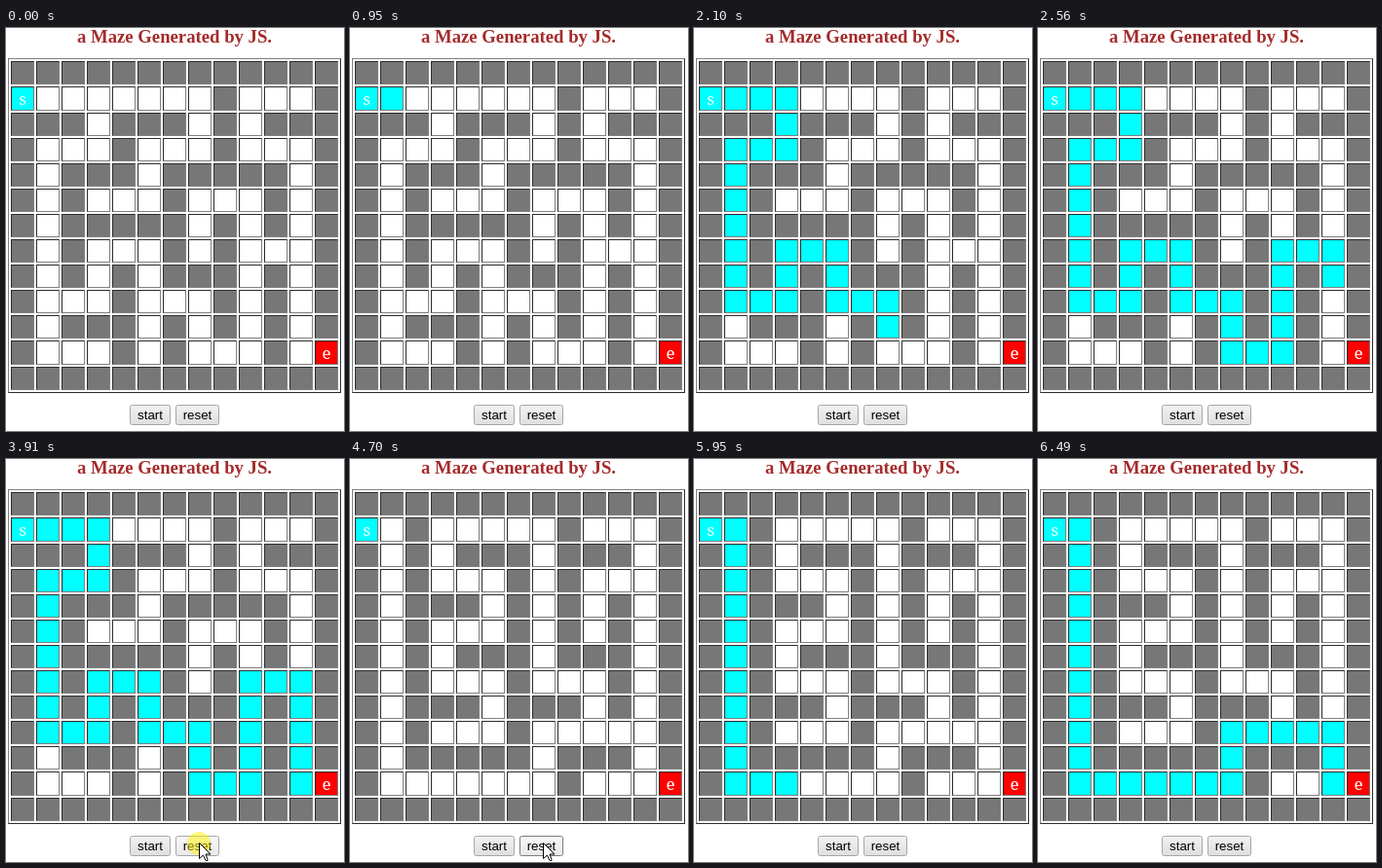
An HTML page with a canvas that plays this animation: 347x414 px, repeating every 7460 ms.

```html
<!DOCTYPE html>
<html lang="en">
<head>
<meta charset="utf-8">
<title>Maze</title>
<style>
  html, body { margin: 0; width: 100%; height: 100%; overflow: hidden; background: #fff; }
  canvas { display: block; }
</style>
</head>
<body>
<canvas id="stage" width="347" height="414"></canvas>
<script>
const ctx = document.getElementById('stage').getContext('2d');
const LOOP = 7460, RESET = 3990;
const LIGHT = '#808080', DARK = '#2c2c2c', MITRE = '#565656';

// Each maze is solved from `start` on, one cell per `step` milliseconds.
const first = makeMaze(950, 48.7, `
#############
        #   #
### ### # ###
#   #   #   #
# ### ##### #
# #   #   # #
# ##### # # #
# #   # #   #
# # # ### # #
#   #   # # #
# ### # # # #
#   # #   #  
#############`);
const second = makeMaze(5340, 47.9, `
#############
  #     #   #
# # ### ### #
# #   # #   #
# ### # # # #
# #   # # # #
# # ### ### #
# #   #   # #
# ### ### # #
# #   #     #
# ##### ### #
#       #    
#############`);

function makeMaze(start, step, plan) {
  const rows = plan.slice(1).split('\n');
  return { start, step, rows, path: solve(rows, 1, 1, 0, 1) };
}

// Depth-first search for the cells leading to the exit in column 12.
function solve(rows, x, y, fromX, fromY) {
  if (x === 12) return [];
  for (const [nx, ny] of [[x + 1, y], [x, y + 1], [x - 1, y], [x, y - 1]]) {
    if (rows[ny][nx] !== ' ' || nx === 0 || (nx === fromX && ny === fromY)) continue;
    const rest = solve(rows, nx, ny, x, y);
    if (rest) return [[x, y], ...rest];
  }
  return null;
}

const ramp = (t, from, to) => Math.min(1, Math.max(0, (t - from) / (to - from)));
const within = (t, from, to) => t >= from && t < to;

function pointerAt(t) {
  const pressed = within(t, 770, 850) || within(t, 3830, RESET) || within(t, 5160, 5290);
  if (t < 2000)
    return { x: 148, y: 414 - 17 * (ramp(t, 310, 520) - ramp(t, 850, 900)), pressed };
  const shift = ramp(t, 4700, 5050);
  return {
    x: 198 - 45 * shift,
    y: 414 + 4 * shift - 20 * (ramp(t, 3300, 3400) - ramp(t, 5440, 5470)),
    pressed
  };
}

function rect(color, x, y, w, h) {
  ctx.fillStyle = color;
  ctx.fillRect(x, y, w, h);
}

function bevel(topLeft, bottomRight, inside, x, y, w, h) {
  rect(bottomRight, x, y, w, h);
  rect(topLeft, x, y, w - 1, h - 1);
  rect(MITRE, x + w - 1, y, 1, 1);
  rect(MITRE, x, y + h - 1, 1, 1);
  rect(inside, x + 1, y + 1, w - 2, h - 2);
}

function text(string, x, y, font, color) {
  ctx.font = font;
  ctx.fillStyle = color;
  ctx.textAlign = 'center';
  ctx.fillText(string, x, y);
}

function drawCell(col, row, color) {
  // The two lettered rows are one pixel taller.
  const y = 34 + 26 * row + (row > 1) + (row > 11);
  const h = row === 1 || row === 11 ? 25 : 24;
  bevel(DARK, LIGHT, color, 5 + 26 * col, y, 24, h);
}

function drawMaze({ start, step, rows, path }, t) {
  bevel(LIGHT, DARK, '#fff', 2, 31, 342, 344);
  rows.forEach((line, row) => [...line].forEach((mark, col) =>
    drawCell(col, row, mark === '#' ? '#777' : '#fff')));
  const filled = Math.max(0, Math.floor((t - start) / step) + 1);
  for (const [col, row] of path.slice(0, filled)) drawCell(col, row, '#0ff');
  drawCell(0, 1, '#0ff');
  drawCell(12, 11, '#f00');
  const font = '17px "Noto Serif", serif';
  text('s', 17, 79, font, '#fff');
  text('e', 329, 340, font, '#fff');
}

function drawButton(label, x, w, pointer) {
  const hover = within(pointer.x, x, x + w) && pointer.y < 408;
  const face = ctx.createLinearGradient(0, 387, 0, 408);
  face.addColorStop(0, hover ? '#f8f8f8' : '#f2f2f2');
  face.addColorStop(1, hover ? '#e8e8e8' : '#dedede');
  ctx.beginPath();
  ctx.roundRect(x + .5, 387.5, w - 1, 20, 2);
  ctx.fillStyle = face;
  ctx.fill();
  ctx.strokeStyle = hover && !pointer.pressed ? '#7b7b7b' : '#a6a6a6';
  ctx.lineWidth = 1;
  ctx.stroke();
  text(label, x + w / 2, 402, '13.333px "Liberation Sans", Arial, sans-serif', '#000');
}

function drawPointer({ x, y, pressed }) {
  if (pressed) {
    ctx.fillStyle = 'rgba(255, 240, 0, .5)';
    ctx.beginPath();
    ctx.arc(x, y + 1, 12, 0, 7);
    ctx.fill();
  }
  ctx.save();
  ctx.translate(Math.round(x) + .5, Math.round(y) + .5);
  const arrow = new Path2D('M0 0V16L4 12.5L6.5 18H8.5V17L6.5 11.5H11.5Z');
  ctx.fillStyle = '#fff';
  ctx.fill(arrow);
  ctx.strokeStyle = '#000';
  ctx.stroke(arrow);
  ctx.restore();
}

function draw(t) {
  const pointer = pointerAt(t);
  rect('#fff', 0, 0, 347, 414);
  text('a Maze Generated by JS.', 173, 15, 'bold 18.72px "Liberation Serif", serif', 'brown');
  drawMaze(t < RESET ? first : second, t);
  drawButton('start', 127, 42, pointer);
  drawButton('reset', 174, 45, pointer);
  if (pointer.y < 414) drawPointer(pointer);
}

const begin = performance.now();
function tick() {
  draw((performance.now() - begin) % LOOP);
  requestAnimationFrame(tick);
}
tick();
</script>
</body>
</html>
```
